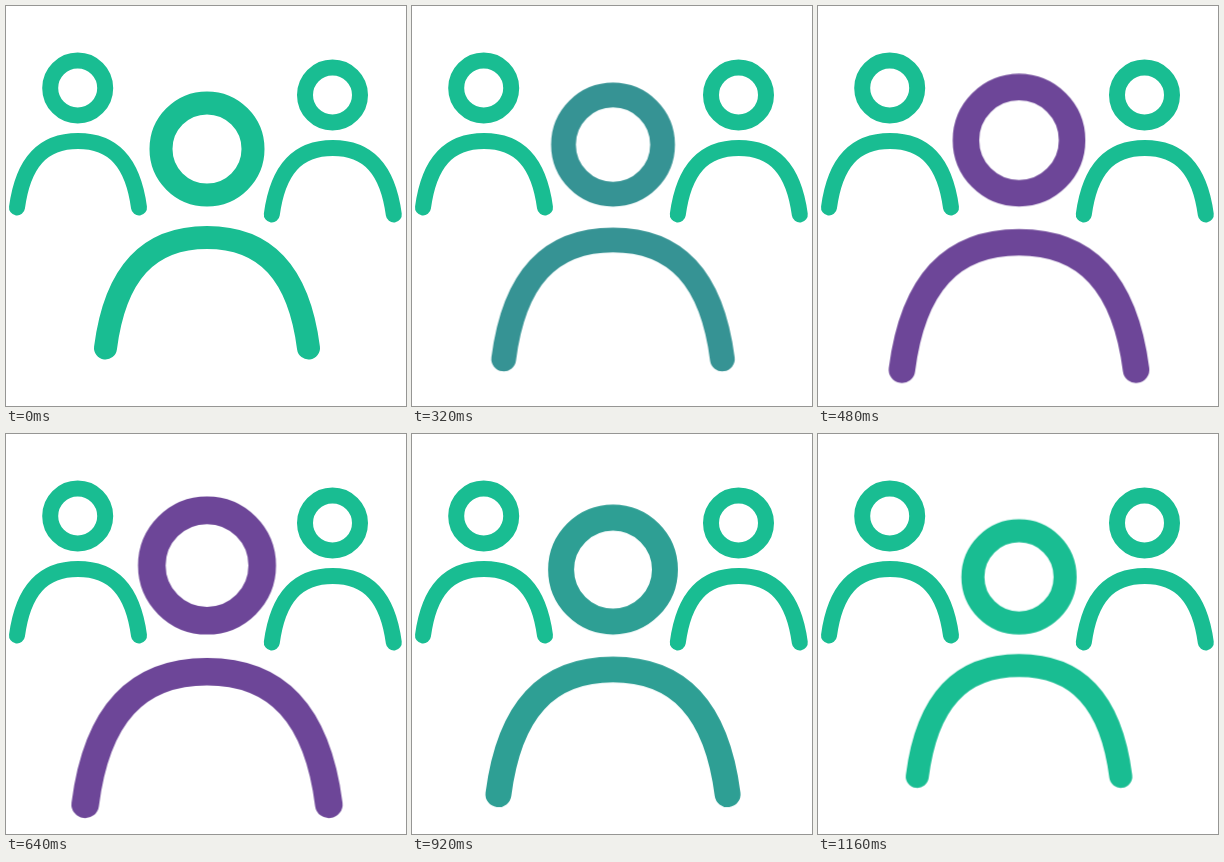
These frames come from a looping animation (400 px wide and 400 px high, 1200 ms). An HTML page:

```html
<!DOCTYPE html>
<html lang="en">
<head>
<meta charset="utf-8">
<title>Group icon</title>
<style>
  html, body { margin: 0; height: 100%; overflow: hidden; background: #fff; }
  svg { display: block; width: 100vw; height: 100vh; }
  g { fill: none; stroke: #19bd92; stroke-linecap: round; }
  #leader {
    stroke-width: 23;
    transform-origin: 201px 200.5px;
    animation: grow 1200ms infinite paused, tint 1200ms linear infinite paused;
  }
  @keyframes grow {
    0% { transform: scale(1); animation-timing-function: cubic-bezier(.45, 0, .7, .92); }
    53.333% { transform: scale(1.2); animation-timing-function: linear; }
    66.667% { transform: scale(1.2); animation-timing-function: cubic-bezier(.3, .15, .5, 1); }
    100% { transform: scale(1); }
  }
  @keyframes tint {
    0%, 20.833%, 80%, 100% { stroke: #19bd92; }
    37.5%, 66.667% { stroke: #6d4698; }
  }
</style>
</head>
<body>
<svg viewBox="0 0 400 400">
  <g id="member" stroke-width="16">
    <circle cx="71.7" cy="82" r="27.5"/>
    <path d="M11 201.5C17 157 36 135 72 135S127 157 133 201.5"/>
  </g>
  <use href="#member" x="254.8" y="7"/>
  <g id="leader">
    <circle cx="201" cy="143" r="46"/>
    <path d="M99.5 342C109 268 142 231.5 201 231.5S293 268 302.5 342"/>
  </g>
</svg>
<script>
  const LOOP = 1200, STEP = 40;
  const start = performance.now();
  const animations = document.getElementById('leader').getAnimations();

  // Seek the paused animations so the pose depends on the clock alone.
  function draw() {
    const time = (performance.now() - start) % LOOP;
    for (const a of animations) a.currentTime = Math.floor(time / STEP) * STEP;
    requestAnimationFrame(draw);
  }
  draw();
</script>
</body>
</html>
```
